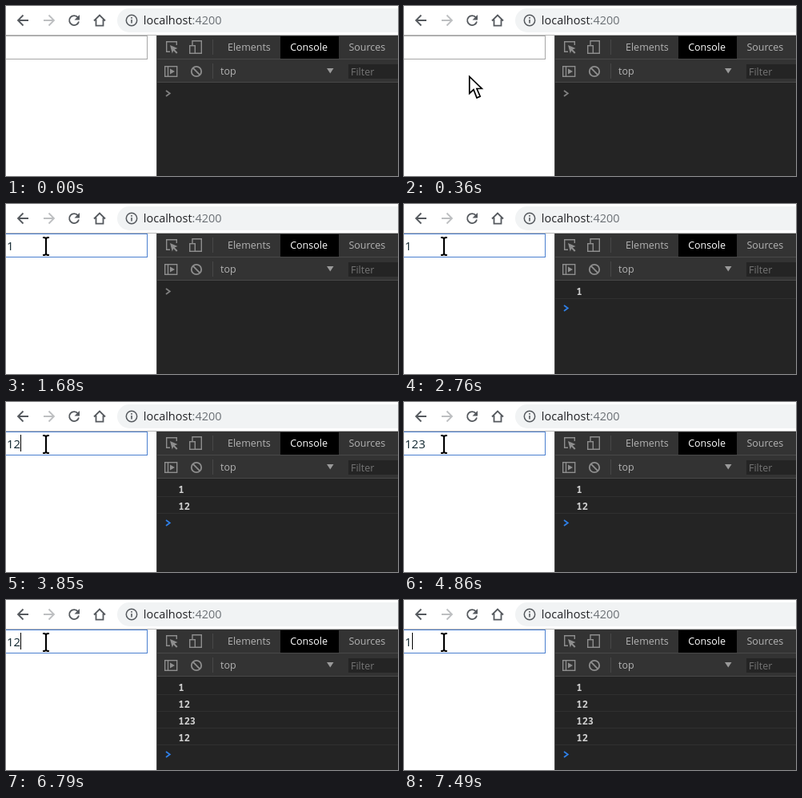
Recreate the animation shown at these times as an HTML page. Size 490 by 213 pixels, loop 8000 ms.

```html
<!DOCTYPE html>
<html lang="en">
<head>
<meta charset="utf-8">
<title>Debounced input</title>
<style>
  html, body { margin: 0; width: 100%; height: 100%; overflow: hidden; background: #fff; }
  svg { display: block; width: 490px; height: 213px; }
  text { font: 12.5px "Open Sans", "Noto Sans", sans-serif; white-space: pre; }
  .url { font-size: 14.5px; }
  #typed { font-size: 15px; fill: #10262f; }
  #logs text { font: bold 11.9px "Noto Sans Mono", "DejaVu Sans Mono", monospace; fill: #d0d0d0; }
  .line { fill: none; stroke-width: 1.8; }
  .tool { fill: none; stroke: #8e8e8e; stroke-width: 1.4; }
</style>
</head>
<body>
<svg viewBox="0 0 490 213">
  <!-- browser bar -->
  <rect x="139" y="3" width="400" height="30" rx="15" fill="#f1f3f4"/>
  <g class="line" stroke="#55595e">
    <path d="M28 18H15.500M21.500 11.500L15 18l6.500 6.500"/>
    <path stroke="#bdbfc1" d="M47 18h12.500M53.500 11.500L60 18l-6.500 6.500"/>
    <path d="M90 14.500A6 6 0 1 0 91 19.500"/>
    <path d="M110 18.500l7-7 7 7M112.500 17v7.700h9V17"/>
    <circle cx="157" cy="18" r="6.700" stroke-width="1.500"/>
    <path stroke-width="1.600" d="M157 17v4.500M157 14v1.700"/>
  </g>
  <path fill="#55595e" d="M92 11v6.500h-6.500z"/>
  <text class="url" x="171.800" y="23" fill="#202124">localhost<tspan fill="#6b7075">:4200</tspan></text>
  <path stroke="#b8b8b8" d="M0 36.500h490"/>

  <!-- page -->
  <rect id="field" x="-5.500" y="37.500" width="182" height="29" fill="#fff"/>
  <text id="typed" x="1" y="57.500"></text>
  <rect id="caret" y="41" width="1" height="21"/>

  <!-- developer tools -->
  <rect x="188" y="37" width="302" height="176" fill="#242424"/>
  <rect x="188" y="37" width="302" height="59" fill="#333"/>
  <path stroke="#484848" d="M188 66.500h302M188 95.500h302M258.500 42v19M258.500 72v19"/>
  <path stroke="#4a4a4a" d="M188.500 37v176"/>
  <rect x="343" y="38" width="73" height="28"/>
  <rect x="428" y="73" width="62" height="18" fill="#242424"/>
  <g class="tool">
    <path d="M205 57.300h-4.300v-12.600h12.600V49"/>
    <path d="M233 49v-5.300h11.300v15.600H237"/>
    <rect x="229.700" y="49.700" width="6.600" height="9.600"/>
    <rect x="198.700" y="75.700" width="15" height="12.600"/>
    <path d="M202.500 76v12"/>
    <circle cx="238" cy="82" r="6.200" stroke-width="1.800"/>
    <path stroke-width="1.800" d="M233.700 77.700l8.600 8.600"/>
  </g>
  <path fill="#8e8e8e" d="M205 49l9.500 4-3.700 1.500 3.700 3.700-1.500 1.500-3.700-3.700-1.500 3.500zM205 78.500l6 3.500-6 3.500z"/>
  <path fill="#9a9a9a" d="M401 78h8.500l-4.200 6.500z"/>
  <g fill="#b4b4b4">
    <text x="277" y="56">Elements</text>
    <text x="355.200" y="56" fill="#fff">Console</text>
    <text x="428.400" y="56">Sources</text>
    <text x="268" y="86">top</text>
    <text x="431" y="87" fill="#757575">Filter</text>
  </g>
  <g id="logs"></g>
  <path id="prompt" class="line" d="M200 106l4.800 3.500-4.800 3.500"/>

  <!-- pointer -->
  <g id="pointer">
    <circle id="press" r="12" fill="#fffb70"/>
    <path id="beam" fill="none" stroke="#000" d="M-4 -11h2.500l1.500 1.500 1.500 -1.500h2.500M0 -10v20M-4 11h2.500l1.500 -1.500 1.500 1.500h2.500"/>
    <path id="arrow" fill="#fff" stroke="#000" stroke-width="1.700" d="M.8 1.500V22.500L6 17.800 10 28 14.200 26.200 10 16.500h6.300z"/>
  </g>
</svg>
<script>
const LOOP = 8000, FOCUS = 910, MOVE = 130, STEP = 76.6, MOVES = 8;
const edits = [[0, ""], [1130, "1"], [2840, "12"], [4310, "123"], [5780, "12"], [7190, "1"]];
const logs = [[2210, "1"], [3850, "12"], [5320, "123"], [6790, "12"]];
const caretToggles = [FOCUS, 1680, 2210, 2760, 2840, 3300, 3850, 4860, 5400, 5860, 6410, 6940, 7490];

const el = id => document.getElementById(id);
const show = (id, on) => el(id).setAttribute("visibility", on ? "visible" : "hidden");
const set = (id, name, value) => el(id).setAttribute(name, value);

el("logs").innerHTML = logs.map(([, value], i) =>
  `<g><text x="215.500" y="${114 + 21 * i}">${value}</text>
   <path stroke="#303030" d="M189 ${118.5 + 21 * i}h301"/></g>`).join("");
const rows = [...el("logs").children];

function drawPointer(t) {
  const step = Math.floor((t - MOVE) / STEP);
  const left = 1 - Math.min(Math.max(step, 0), MOVES) / MOVES;
  const x = Math.round(50 + 181 * left ** 3.76);
  const y = Math.round(53 + 120 * left ** 2.69);
  const visible = t >= MOVE, overField = y < 67 && x < 177;
  const pressed = step > MOVES && t < FOCUS;
  set("pointer", "transform", `translate(${x} ${y})`);
  show("arrow", visible && !overField);
  show("beam", visible && overField);
  set("beam", "stroke-width", pressed ? 1.4 : 2.2);
  show("press", pressed);
}

function draw(t) {
  const past = time => t >= time;
  const text = edits.filter(([time]) => past(time)).pop()[1];
  const logged = logs.filter(([time]) => past(time)).length;
  el("typed").textContent = text;
  set("field", "stroke", past(FOCUS) ? "#4a7fd0" : "#a6a6a6");
  set("caret", "x", Math.round(1 + 8.6 * text.length));
  show("caret", caretToggles.filter(past).length % 2);
  rows.forEach((row, i) => row.setAttribute("visibility", i < logged ? "visible" : "hidden"));
  set("prompt", "transform", `translate(0 ${21 * logged})`);
  set("prompt", "stroke", logged ? "#2f7fe6" : "#808080");
  drawPointer(t);
}

function tick() {
  draw(performance.now() % LOOP);
  requestAnimationFrame(tick);
}
tick();
</script>
</body>
</html>
```
